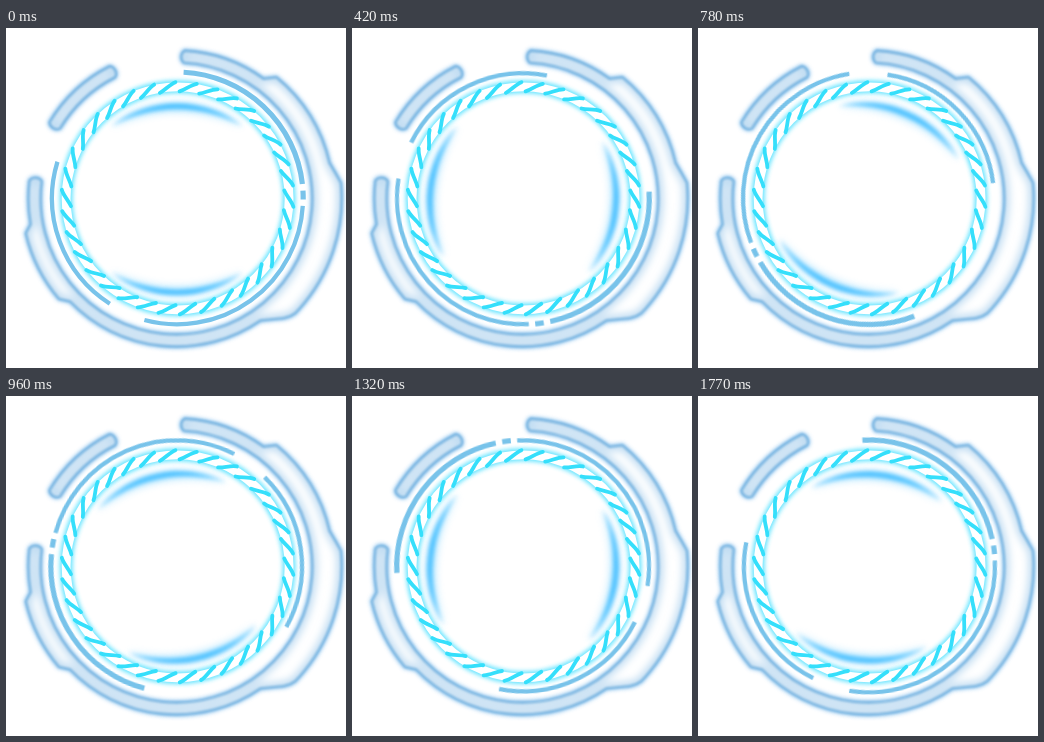
These frames come from a looping animation (340x340 px, 1800 ms). An HTML page:

```html
<!DOCTYPE html>
<html>
<head>
<meta charset="utf-8">
<style>
  html, body { margin: 0; height: 100%; overflow: hidden; background: #fff; }
  svg { display: block; width: 100vw; height: 100vh; }
  path { fill: none; stroke-linejoin: round; }
</style>
</head>
<body>
<svg viewBox="-170.5 -170.5 340 340">
  <defs id="defs">
    <clipPath id="inside"><path id="clip"/></clipPath>
  </defs>
  <g id="frame"></g>
  <g transform="translate(.5 -.2)"><g id="ring" filter="url(#soft)"></g></g>
  <g transform="translate(.5 .8)"><g id="shine"></g></g>
  <g id="rope" transform="translate(1.1 -.2)"></g>
</svg>
<script>
const $ = id => document.getElementById(id);
const STEP = 30, STEPS = 60;

for (const [id, size] of [['soft', .6], ['edge', 1], ['glow', 2.2], ['haze', 4]])
  $('defs').insertAdjacentHTML('beforeend',
    `<filter id="${id}" filterUnits="userSpaceOnUse" x="-171" y="-171" width="342" height="342">
      <feGaussianBlur stdDeviation="${size}"/></filter>`);

const polar = (r, deg) => {
  const a = deg * Math.PI / 180;
  return (r * Math.cos(a)).toFixed(2) + ' ' + (r * Math.sin(a)).toFixed(2);
};

// Arc on radius r from angle a to b, as a continuation of the current path
const arc = (r, a, b) =>
  `L${polar(r, a)}A${r} ${r} 0 ${+(Math.abs(b - a) > 180)} ${+(b > a)} ${polar(r, b)}`;
const corner = (r, deg, r2, deg2) => `Q${polar(r, deg)} ${polar(r2, deg2)}`;
const cap = (r, deg) => `A7.5 7.5 0 0 1 ${polar(r, deg)}`;
const start = d => 'M' + d.slice(1);

function add(parent, d, look) {
  $(parent).insertAdjacentHTML('beforeend', `<path d="${d}" ${look}/>`);
}
const line = (color, width, blur, opacity = 1) =>
  `stroke="${color}" stroke-width="${width}" opacity="${opacity}"` + (blur ? ` filter="url(#${blur})"` : '');
const fill = (color, blur, opacity = 1) =>
  `style="fill:${color}" opacity="${opacity}"` + (blur ? ` filter="url(#${blur})"` : '');

// Fixed outer frame
const IN = 136, OUT = 148;
const body = start(
  arc(OUT, -86.8, -54) + arc(157, -50.5, -13) + corner(161, -9, 165, -5.5) +
  arc(165, -5.5, 42) + corner(167, 46, 156, 50.5) +
  arc(OUT, 55.5, 136) + arc(154.5, 139.5, 167) + arc(OUT, 170, 187) + cap(IN, 187.3) +
  arc(IN, 187.3, -86.8)) + cap(OUT, -86.8) + 'Z';
const tab = start(arc(OUT, 211, 243.2) + cap(IN, 243.2) + arc(IN, 243.2, 211)) + cap(OUT, 211) + 'Z';
const outline = body + tab;
$('clip').setAttribute('d', outline);
add('frame', outline, line('#64aee8', 4, 'glow', .75));
$('frame').insertAdjacentHTML('beforeend', '<g id="inner" clip-path="url(#inside)"></g>');
add('inner', outline, fill('#fff'));
add('inner', outline, line('#b4d5ef', 8, 'haze'));
add('frame', outline, line('#78b4e0', 2.3, 'edge'));

// Turning ring
const segment = (r, a, b, width) => add('ring', start(arc(r, a, b)), line('#78c3ea', width));
segment(126.2, -87, -6.5, 5.2);
segment(126.2, -3.5, .5, 5.2);
segment(126, 3.4, 105, 4.3);
segment(125, 122.5, 197, 4.3);

// Two opposite crescents of light, flatter than the ring
for (const mid of [-90, 90]) {
  const a = mid - 42, b = mid + 42;
  const moon = (outer, inner) => `M${polar(98, a)}A${outer} ${outer} 0 0 1 ${polar(98, b)}` +
    `A${inner} ${inner} 0 0 0 ${polar(98, a)}Z`;
  add('shine', moon(106, 145), fill('#52c4ff', 'haze', .55));
  add('shine', moon(106, 130), fill('#3cbcff', 'glow'));
}

// Rope: a white band cut by slanted strokes, with a glow around it
const CELLS = 34, PITCH = 360 / CELLS, MID = 111.5, HALF = 4.6;
const circle = start(arc(MID, 0, 180) + arc(MID, 180, 360));
let strokes = '';
for (let i = 0; i < CELLS; i++) {
  const a = -90 + (i + .5) * PITCH, lean = PITCH * .4;
  strokes += `M${polar(MID - HALF, a - lean)}C${polar(MID - HALF * .6, a - lean * .3)} ` +
    `${polar(MID + HALF * .6, a + lean * .3)} ${polar(MID + HALF, a + lean)}`;
}
add('rope', circle, line('#35dcff', 13, 'glow', .75));
add('rope', circle, line('#fff', 2 * HALF - .4, 'soft'));
add('rope', strokes, line('#35dffb', 3.8) + ' stroke-linecap="round"');

function draw() {
  const turn = Math.floor(performance.now() / STEP) % STEPS * 360 / STEPS;
  $('ring').setAttribute('transform', `rotate(${turn})`);
  $('shine').setAttribute('transform', `rotate(${-turn})`);
  requestAnimationFrame(draw);
}
draw();
</script>
</body>
</html>
```
